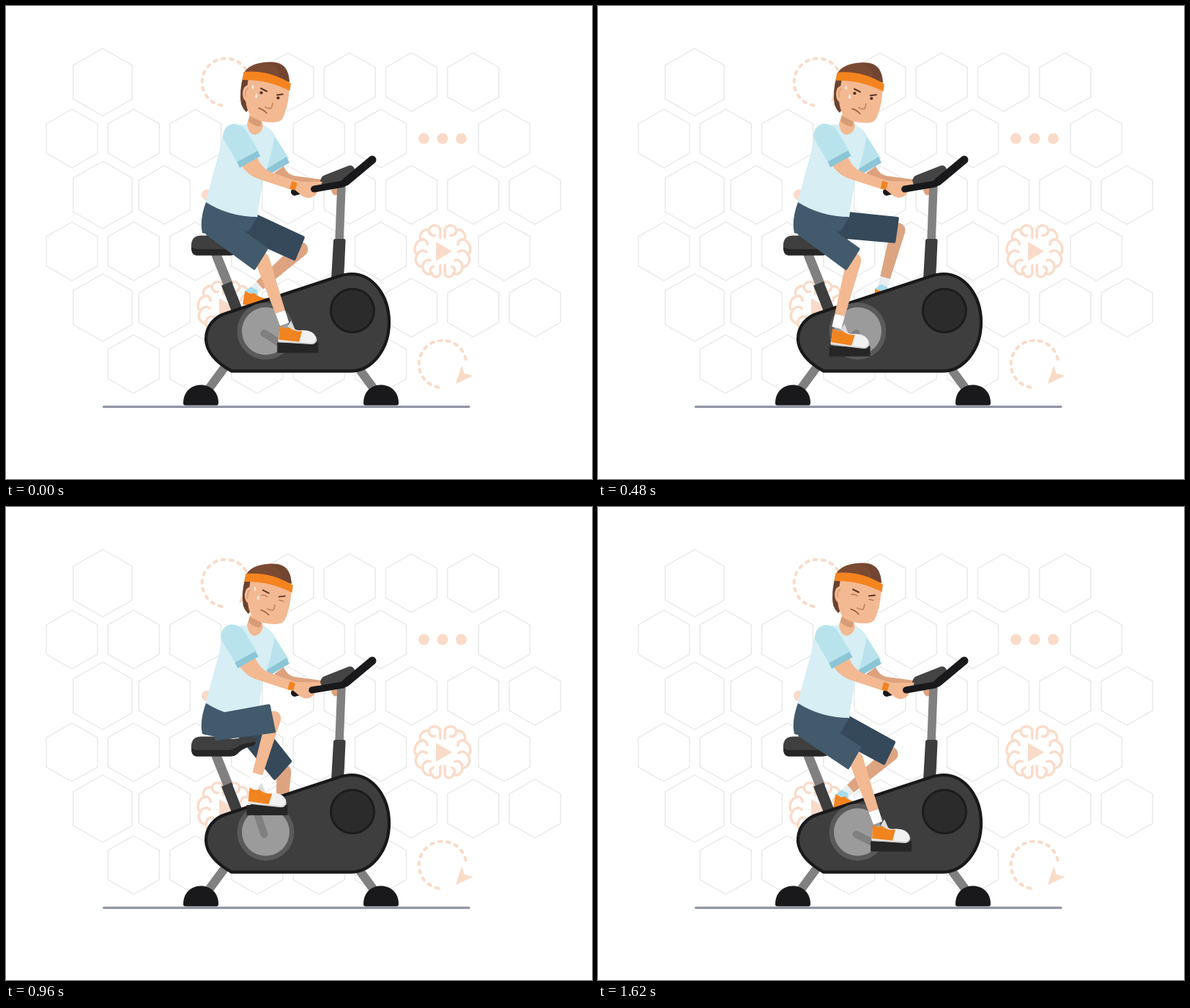
Recreate the animation shown at these times as an HTML page. Size 800x646 px, loop 1.65 s.

```html
<!DOCTYPE html>
<html lang="en">
<head>
<meta charset="utf-8">
<title>Exercise bike</title>
<style>
  html, body { margin: 0; width: 100%; height: 100%; overflow: hidden; background: #fff; }
  svg { display: block; width: 800px; height: 646px; }
</style>
</head>
<body>
<svg viewBox="0 0 800 646" xmlns="http://www.w3.org/2000/svg">
  <defs>
    <g id="half" fill="none" stroke="#fadbc9" stroke-width="3.300" stroke-linecap="round" stroke-linejoin="round">
      <path d="M-3-18V-27C-3-36-17-36-18-28C-27-30-32-20-28-15C-37-12-39 1-33 4C-39 12-32 22-26 20C-26 28-19 32-14 29C-12 36-3 35-3 27V18"/>
      <path d="M-18-28C-18-22-13-20-10-21M-28-15C-24-17-20-13-20-9M-33 4C-30-2-24-2-21 1M-26 20C-26 14-21 10-16 12M-14 29C-18 26-16 21-12 20"/>
    </g>
    <g id="brain">
      <use href="#half" transform="scale(1.040)"/><use href="#half" transform="scale(-1.040 1.040)"/>
      <path d="M-9-13L13 0L-9 13Z" fill="#fadbc9"/>
    </g>
    <g id="spin" fill="#fadbc9">
      <path d="M-5.600 31.800A32.300 32.300 0 1 1 32-4.500" fill="none" stroke="#fadbc9" stroke-width="4" stroke-linecap="round" stroke-dasharray="3.800 7.500"/>
      <path d="M26 2L30 13L42 16L18 27Z"/>
    </g>
    <g id="dots" fill="#fadbc9">
      <circle cx="-25.500" r="7.500"/><circle r="7.500"/><circle cx="25.500" r="7.500"/>
    </g>
    <g id="shoe">
      <path d="M-26-13L-25-27L-11-27Q-3-23 5-24Q21-25 25.500-14Q26-5 19-5L-25-8Q-28-9-26-13Z" fill="#f1f1f1"/>
      <path d="M-25-30Q-18-25-12-28Q-3-21 6-23L2-8L-26-11Z" fill="#f28420"/>
      <path d="M-26-8.500L19-5.500Q25-6 25.500-12" fill="none" stroke="#d4d4d4" stroke-width="1.800"/>
    </g>
    <path id="dome" d="M-24 22C-24 6-13-3 0-3S24 6 24 22Q24 25 21 25H-21Q-24 25-24 22Z" fill="#19191b"/>
  </defs>

  <rect width="800" height="646" fill="#fff"/>
  <path id="hexes" fill="none" stroke="#e8e8e8" stroke-width="1.400"/>
  <use href="#spin" x="300" y="104"/><use href="#spin" x="596" y="489"/>
  <use href="#brain" x="596" y="335"/><use href="#brain" x="300" y="412"/>
  <use href="#dots" x="596" y="181"/><use href="#dots" x="300" y="258"/>

  <g id="farArm">
    <path d="M366 228L379 219Q384 230 394 232L431 237L433 243L392 239Q376 239 366 228Z" fill="#dda27d"/>
    <path d="M443 247L454 246L453 257Q449 261 445 255Z" fill="#dda27d"/>
    <path d="M350 164Q362 166 367 178L386 208L358 226L346 200Z" fill="#b8e3ed"/>
    <path d="M383 206L387 214L360 230L355 223Z" fill="#8cc5d6"/>
  </g>

  <g id="farLeg">
    <path id="farSkin" fill="#dda481"/>
    <path id="farSock" fill="#e9eef0"/>
    <g id="farShoe">
      <path d="M-25-29L-18-36L-9-33L-6-24Z" fill="#a5dced"/>
      <use href="#shoe"/>
    </g>
    <path id="farThigh" fill="#35495a" stroke="#35495a" stroke-width="4" stroke-linejoin="round"/>
  </g>

  <g id="bike">
    <path d="M304 486L273 528M475 486L506 528" stroke="#808080" stroke-width="12"/>
    <use href="#dome" x="266" y="520.500"/><use href="#dome" x="512" y="520.500"/>
    <path d="M133.500 547.300H632" stroke="#9297a6" stroke-width="3.200" stroke-linecap="round"/>
    <path d="M286 337L304 382" stroke="#808080" stroke-width="13"/>
    <path d="M301 379L316 417" stroke="#3d3d3d" stroke-width="15"/>
    <path d="M458 244L455 322" stroke="#808080" stroke-width="11.500"/>
    <path d="M447 321Q447 318 450 318H461Q464 318 463.500 322L461 374H444Z" fill="#3d3d3d"/>
    <path d="M301 419.500L453 369.500Q463 366 472 366C500 366 523 395 523 432C523 468 500 498.700 470 498.700H308C285 486 273 470 273 455C273 437 285 424 301 419.500Z" fill="#3e3e3e" stroke="#19191b" stroke-width="4.200"/>
    <circle cx="473" cy="416" r="29.500" fill="#2b2b2b" stroke="#1c1c1e" stroke-width="3"/>
    <circle cx="354.500" cy="444" r="39" fill="#5a5a5a"/>
    <circle cx="354.500" cy="444" r="32.500" fill="#9b9b9b"/>
    <path d="M253 330Q252 313.500 266 313.500H297Q310 320 322 314H336Q341 315 341 321Q340 327 333 327Q322 330 316 337Q312 340.500 306 340.500H260Q253 340 253 330Z" fill="#3f3f3f"/>
    <path d="M253 329Q255 332 261 332H304Q312 331 318 326Q326 322 341 321Q340 327 333 327Q322 330 316 337Q312 340.500 306 340.500H260Q253 340 253 329Z" fill="#262626"/>
    <path d="M429 239Q430 233 435 231L468 218Q474 217 476 223L462 239L431 244Z" fill="#444"/>
  </g>

  <path d="M329 162Q308 161 299 169Q294 178 291 200L272 269Q300 290 343 289Q346 262 352 236L361 205L367 178Q360 165 350 162Z" fill="#d6eef4"/>
  <path d="M329 161Q331 175 340 176Q349 174 351 163L347 150L333 148Z" fill="#f3b992"/>
  <path d="M333 150L349 158L347 165Q336 163 331 157Z" fill="#d59c76"/>

  <g id="nearLeg">
    <path id="crank" stroke="#808080" stroke-width="10" stroke-linecap="round"/>
    <path id="hip" d="M273 268Q305 288 343 288L332 307L300 317L268 310Q264 292 273 268Z" fill="#425a6b"/>
    <rect id="pedal" x="-28" y="-7" width="56" height="14" fill="#262627"/>
    <path id="nearSkin" fill="#f3b992"/>
    <path id="nearSock" fill="#fff"/>
    <g id="nearShoe">
      <path d="M-14-29L-9-37L-4-26L0-22L-10-24Z" fill="#d9dcdf"/>
      <use href="#shoe"/>
    </g>
    <path id="nearThigh" fill="#425a6b" stroke="#425a6b" stroke-width="4" stroke-linejoin="round"/>
  </g>

  <path d="M394 254L412 249" stroke="#19191b" stroke-width="10" stroke-linecap="round"/>
  <g id="nearArm">
    <path d="M322 219L342 205Q349 222 362 227L396 239L390 251L350 238Q333 234 322 219Z" fill="#f3b992"/>
    <path d="M394 240L432 240L428 248L423 258Q413 266 404 259L393 250Z" fill="#f3b992"/>
    <rect x="-4" y="-5.500" width="8" height="11" rx="1.500" transform="translate(392.500 245.500) rotate(16)" fill="#f28420"/>
    <path d="M296 180Q296 164 310 161Q323 161 329 172L346 200L317 216Z" fill="#b8e3ed"/>
    <path d="M343 198L347.500 205L319 221L315.500 213Z" fill="#8cc5d6"/>
  </g>
  <path id="bar" fill="none" stroke="#19191b" stroke-width="9" stroke-linecap="round" stroke-linejoin="round"/>
  <path d="M464 240L500 210" stroke="#19191b" stroke-width="11" stroke-linecap="round"/>

  <g id="head">
    <path d="M324 95Q318 116 321 134Q323 140 328 145L340 130L338 100Z" fill="#6b4230"/>
    <path d="M331 98L387 110Q386 132 381 145C378 156 374 159 364 159Q347 159 337 152Q328 145 327 126Z" fill="#f3b992"/>
    <path d="M333 108Q324 107 323 119Q323 131 332 132Z" fill="#f3b992"/>
    <path d="M331 112Q326 114 327 124" fill="none" stroke="#d59c76" stroke-width="1.500"/>
    <path d="M324 94C328 81 346 76 363 76.500C379 77 386 86 387 104L356 95Z" fill="#7b4a32"/>
    <path d="M357 77.500C379 77 387 88 387 104L372 98Q378 86 357 77.500Z" fill="#6b4230" opacity=".6"/>
    <path d="M324.500 90Q359 87 389 106L387.500 116Q357 100 322.500 101Z" fill="#f5841f"/>
    <g fill="none" stroke-linecap="round">
      <path d="M348 112.500L356 116.500M370 121.500L378 120.500" stroke="#5d3826" stroke-width="2"/>
      <path d="M364 133Q363 140 361 140Q357 140 354 138" stroke="#c9875f" stroke-width="1.800"/>
      <path d="M345 139.500Q351 141 356 146.500" stroke="#8d5537" stroke-width="1.300"/>
      <path id="shut" d="M346 119.500Q351 118.500 354 121.500M370 126L376 127.500" stroke="#b07a58" stroke-width="1.300"/>
    </g>
    <g id="open" fill="#4c3022"><circle cx="348.500" cy="118.500" r="2.100"/><circle cx="371.500" cy="125.500" r="2.100"/></g>
    <g id="sweat" fill="#fde6d8">
      <path d="M337 107Q334 112 336.500 113.500Q340 113 337 107Z"/><path d="M342 119Q338 124 341 126Q345 125 342 119Z"/>
    </g>
  </g>
</svg>
<script>
const LOOP = 1650, STEP = 30, RAD = Math.PI / 180;
const $ = id => document.getElementById(id);
const set = (id, name, value) => $(id).setAttribute(name, value);
const at = (p, deg, r) => [p[0] + r * Math.cos(deg * RAD), p[1] + r * Math.sin(deg * RAD)];
const fmt = p => p.map(v => v.toFixed(2)).join(' ');
const poly = pts => 'M' + pts.map(fmt).join('L') + 'Z';

// Pose keys over one loop
const times = [0, 330, 630, 960, 1170, 1440, 1620];
const crankKeys = [34, 101, 172, 249, 290, 343.6, 388];
const nearKeys = [37, 44, 26, -6.7, -10, 10.2, 34.5];
const farKeys = [25, 2, 16.5, 51.5, 56.5, 43, 29];

// Smooth periodic curve through the keys; turn is the gain per loop
function track(keys, t, turn = 0) {
  const n = times.length;
  const key = i => {
    const lap = Math.floor(i / n), k = i - lap * n;
    return [times[k] + lap * LOOP, keys[k] + lap * turn];
  };
  let i = n - 1;
  while (times[i] > t) i--;
  const [a, b, c, d] = [-1, 0, 1, 2].map(o => key(i + o));
  const span = c[0] - b[0], u = (t - b[0]) / span;
  const m1 = (c[1] - a[1]) / (c[0] - a[0]) * span;
  const m2 = (d[1] - b[1]) / (d[0] - b[0]) * span;
  const u2 = u * u, u3 = u2 * u;
  return b[1] * (2 * u3 - 3 * u2 + 1) + m1 * (u3 - 2 * u2 + u) +
    c[1] * (3 * u2 - 2 * u3) + m2 * (u3 - u2);
}

function tube(a, b, ra, rb) {
  const deg = Math.atan2(b[1] - a[1], b[0] - a[0]) / RAD;
  return `M${fmt(at(a, deg + 90, ra))}A${ra} ${ra} 0 0 1 ${fmt(at(a, deg - 90, ra))}` +
    `L${fmt(at(b, deg - 90, rb))}L${fmt(at(b, deg + 90, rb))}Z`;
}

function leg(side, { hip, angle, len, pedal, foot, tilt, hem, top, cut }) {
  const knee = at(hip, angle, len + 1), end = at(hip, angle, len - 2);
  const ankle = [pedal[0] + foot[0], pedal[1] + foot[1]];
  const deg = Math.atan2(ankle[1] - knee[1], ankle[0] - knee[0]) / RAD;
  const cuff = at(ankle, deg, -18);
  set(side + 'Skin', 'd', tube(knee, cuff, 10, 7));
  set(side + 'Sock', 'd', poly([at(cuff, deg - 90, 7), at(cuff, deg + 90, 7),
    at(ankle, deg + 90, 6.5), at(ankle, deg - 90, 6.5)]));
  set(side + 'Shoe', 'transform', `translate(${fmt(pedal)}) rotate(${tilt.toFixed(2)})`);
  // The outline stroke adds 2 px on every side
  set(side + 'Thigh', 'd', poly([at(hip, angle - 90, top - 2), at(end, cut - 90, hem - 2),
    at(end, cut + 90, hem - 2), at(hip, angle + 90, hem - 1)]));
}

function draw(t) {
  const turn = track(crankKeys, t, 360);
  const pedal = at([369, 447], turn, 35.3);
  const near = track(nearKeys, t), far = track(farKeys, t);
  const cos = Math.cos(turn * RAD);
  leg('near', {
    hip: [285, 298], angle: near, len: 80, pedal, foot: [-18, -32],
    tilt: 1.5 - 2 * cos, hem: 19.7 - 0.05 * near, top: 15, cut: near - 5
  });
  leg('far', {
    hip: [329, 298], angle: far, len: 80, pedal: at([377, 441], turn + 180, 35.3), foot: [-15, -28],
    tilt: 4 + 3 * cos, hem: 18, top: 18, cut: 15 + (far - 15) * 0.75
  });
  set('pedal', 'transform', `translate(${fmt(pedal)})`);
  set('crank', 'd', `M352.500 447L${fmt([pedal[0] - 15, pedal[1]])}`);

  const sway = 1.5 * (1 - Math.cos(2 * Math.PI * t / LOOP));
  set('head', 'transform', `translate(${fmt([sway, sway * 0.4])})`);
  set('nearArm', 'transform', `translate(${fmt([-sway, -sway * 0.3])})`);
  set('bar', 'd', `M${fmt([420.5 - sway, 250])}L460 243L500 210`);

  const squint = t >= 810;
  set('shut', 'opacity', squint ? 1 : 0);
  set('open', 'opacity', squint ? 0 : 1);
  set('sweat', 'opacity', t % 480 < 120 ? 1 : 0);
}

// Background honeycomb
const hex = (x, y, k = 1) =>
  poly([[0, -40], [35, -20], [35, 20], [0, 40], [-35, 20], [-35, -20]]
    .map(([dx, dy]) => [x + dx * k, y + dy * k]));
const rows = [
  [104, 132, [3, 4, 5, 6]],
  [181, 90, [0, 1, 2, 4, 5, 7]],
  [258, 132, [1, 3, 4, 5, 6, 7]],
  [335, 90, [0, 1, 2, 3, 4, 5, 7]],
  [412, 132, [1, 3, 4, 5, 6, 7]],
  [489, 90, [1, 2, 3, 4, 5]]
];
set('hexes', 'd', rows.map(([y, x, cols]) => cols.map(c => hex(x + c * 84.3, y)).join('')).join('') +
  [104, 258, 412].map(y => hex(132, y, 1.15)).join(''));

const start = performance.now();
function frame() {
  const t = (performance.now() - start) % LOOP;
  draw(Math.floor(t / STEP) * STEP);
  requestAnimationFrame(frame);
}
frame();
</script>
</body>
</html>
```
